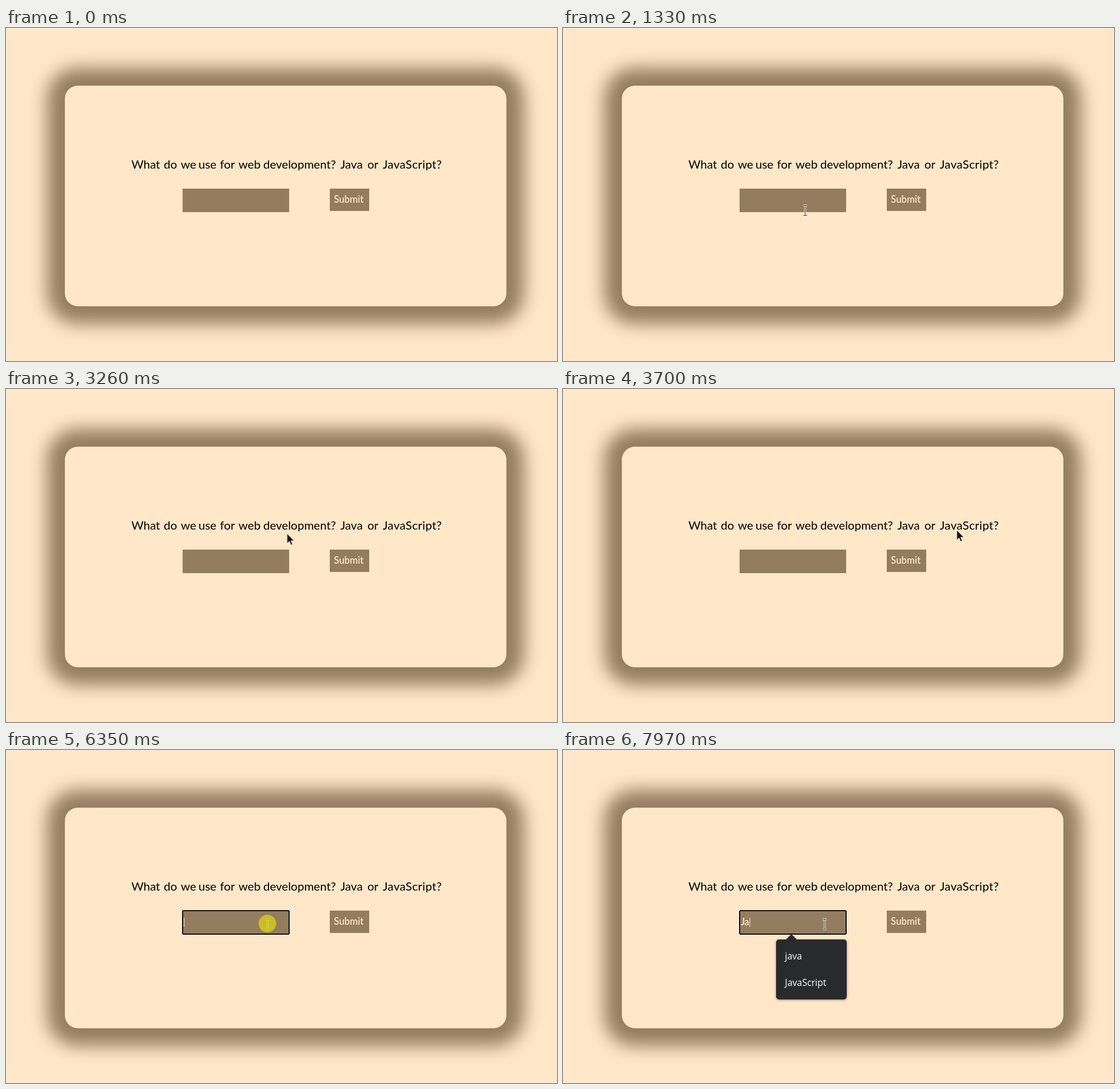
Recreate the animation shown at these times as an HTML page. Size 936 by 566 pixels, loop 7990 ms.

```html
<!DOCTYPE html>
<html lang="en">
<head>
<meta charset="utf-8">
<title>Quiz question</title>
<style>
  :root { --cream: #ffe7c8; --brown: #937d5e; --loop: 7990ms; }
  html, body { margin: 0; width: 100%; height: 100%; overflow: hidden; background: var(--cream); }
  .card {
    position: absolute; left: 100px; top: 98px; width: 750px; height: 375px;
    border-radius: 22px; background: var(--cream); box-shadow: 0 0 30px 30px var(--brown);
  }
  svg { position: absolute; left: 0; top: 0; }
  .question { font: 20px Lato, sans-serif; fill: #000; }
  .label { font: 600 16.3px Lato, sans-serif; fill: var(--cream); }
  .list { filter: drop-shadow(0 1px 2px rgba(0, 0, 0, .4)); fill: #292a2e; }
  .list text { font: 15.5px "Open Sans", sans-serif; fill: #fff; }

  /* on/off states */
  .focus, .click, .list, .more, .j, .a, .caret, .arrow, .beam {
    opacity: 0; animation: var(--loop) step-end infinite;
  }
  .focus { animation-name: focus; }
  .click { animation-name: click; }
  .list { animation-name: list; }
  .more { animation-name: more; }
  .j { animation-name: j; }
  .a { animation-name: a; }
  .caret { animation-name: caret; }
  .arrow { animation-name: arrow; }
  .beam { animation-name: beam; }
  @keyframes focus { 0% { opacity: 0 } 79.47%, 100% { opacity: 1 } }
  @keyframes click { 0% { opacity: 0 } 79.47% { opacity: 1 } 80.73%, 100% { opacity: 0 } }
  @keyframes list { 0% { opacity: 0 } 79.72%, 100% { opacity: 1 } }
  @keyframes more { 0% { opacity: 1 } 89.61%, 100% { opacity: 0 } }
  @keyframes j { 0% { opacity: 0 } 88.36%, 100% { opacity: 1 } }
  @keyframes a { 0% { opacity: 0 } 99.75%, 100% { opacity: 1 } }
  @keyframes caret {
    0% { opacity: 0; transform: translateX(302px) }
    79.47% { opacity: 1; transform: translateX(302px) }
    86.11% { opacity: 0; transform: translateX(302px) }
    88.36% { opacity: 1; transform: translateX(307px) }
    96.25% { opacity: 0; transform: translateX(307px) }
    99.75%, 100% { opacity: 1; transform: translateX(317px) }
  }
  @keyframes arrow {
    0% { opacity: 0 } 8.76% { opacity: 1 } 16.1% { opacity: 0 }
    23.1% { opacity: 1 } 51.69%, 100% { opacity: 0 }
  }
  @keyframes beam {
    0% { opacity: 0 } 16.1% { opacity: 1 } 23.1% { opacity: 0 } 51.69%, 100% { opacity: 1 }
  }

  /* mouse path */
  .mouse { animation: mouse var(--loop) linear infinite; }
  @keyframes mouse {
    0%, 8.76% { transform: translate(828px, 552px) }
    9.51% { transform: translate(777px, 535px) }
    10.26% { transform: translate(700px, 508px) }
    11.26% { transform: translate(625px, 463px) }
    12.52% { transform: translate(522px, 398px) }
    13.77% { transform: translate(460px, 345px) }
    15.02% { transform: translate(425px, 320px) }
    16.65%, 20.15% { transform: translate(411px, 310px) }
    21.28% { transform: translate(395px, 300px) }
    23.15% { transform: translate(348px, 272px) }
    24.53% { transform: translate(272px, 250px) }
    25.78% { transform: translate(222px, 235px) }
    27.16%, 30.66% { transform: translate(207px, 231px) }
    31.79% { transform: translate(205px, 231px) }
    33.04%, 35.04% { transform: translate(210px, 231px) }
    36.55% { transform: translate(250px, 238px) }
    38.17% { transform: translate(315px, 245px) }
    40.68% { transform: translate(470px, 246px) }
    42.55% { transform: translate(575px, 244px) }
    43.8% { transform: translate(632px, 242px) }
    44.93%, 45.18% { transform: translate(652px, 241px) }
    46.31%, 47.56% { transform: translate(669px, 240px) }
    48.56% { transform: translate(650px, 240px) }
    50.06% { transform: translate(575px, 262px) }
    51.31% { transform: translate(500px, 284px) }
    52.57% { transform: translate(458px, 301px) }
    53.44% { transform: translate(446px, 300px) }
    54.32%, 100% { transform: translate(444px, 296px) }
  }
</style>
</head>
<body>
<div class="card"></div>
<svg width="936" height="566" viewBox="0 0 936 566">
  <text class="question" y="239">
    <tspan x="213">What</tspan> <tspan x="268">do</tspan> <tspan x="297">we</tspan>
    <tspan x="327">use</tspan> <tspan x="363.5">for</tspan> <tspan x="395">web</tspan>
    <tspan x="437">development?</tspan> <tspan x="568">Java</tspan> <tspan x="614">or</tspan>
    <tspan x="640" letter-spacing=".3">JavaScript?</tspan>
  </text>

  <rect x="300" y="273" width="181" height="40" fill="#937d5e"/>
  <rect x="550" y="273" width="67" height="38" fill="#937d5e"/>
  <text class="label" x="557" y="297">Submit</text>

  <g class="focus" fill="none">
    <rect x="298.5" y="271.5" width="184" height="43" rx="3.5" stroke="#fff"/>
    <rect x="300" y="273" width="181" height="40" rx="2" stroke="#101010" stroke-width="2"/>
  </g>
  <text class="label j" x="302" y="298">J</text>
  <text class="label a" x="308" y="298">a</text>
  <rect class="caret" y="285" width="1" height="16" fill="#ffe7c8"/>

  <g class="list">
    <path d="M378 323L388 313L398 323Z"/>
    <g class="more">
      <rect x="362" y="322" width="120" height="237" rx="5"/>
      <text x="377" y="446">HTML</text>
      <text x="377" y="491">CSS</text>
      <text x="377" y="536">Python</text>
    </g>
    <rect x="362" y="322" width="120" height="102" rx="5"/>
    <text x="377" y="356">java</text>
    <text x="377" y="401">JavaScript</text>
  </g>

  <g class="mouse">
    <path class="arrow" d="M0 0V16.5L3.8 13L6.6 19.2L9.2 18L6.5 12H11.8Z"
      fill="#14151a" stroke="#fff" stroke-opacity=".75" stroke-width=".8"/>
    <g class="beam" transform="translate(.5 0)" fill="none">
      <path id="bar" d="M-3 -8.5H3M0 -8.5V8.5M-3 8.5H3" stroke="#fff" stroke-width="3"/>
      <path d="M-3 -8.5H3M0 -8.5V8.5M-3 8.5H3" stroke="#222"/>
    </g>
  </g>
  <circle class="click" cx="444" cy="295" r="15" fill="#dcd214" fill-opacity=".75"/>
</svg>
</body>
</html>
```
